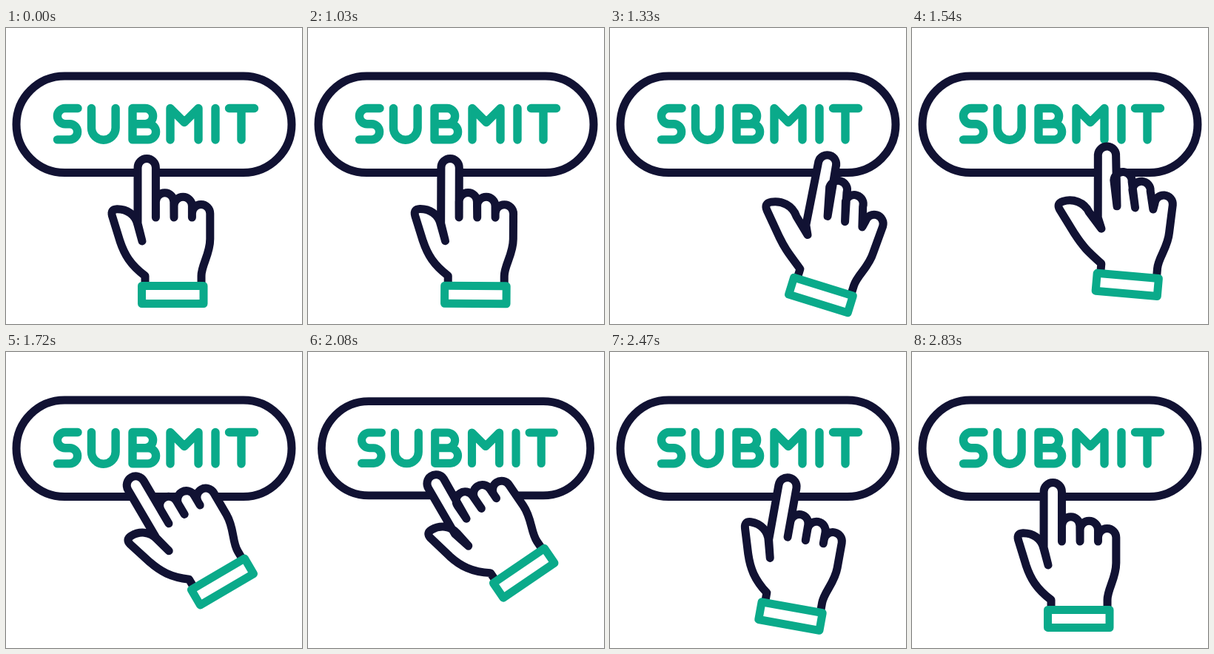
Recreate the animation shown at these times as an HTML page. Size 400 by 400 pixels, loop 2.86 s.

```html
<!DOCTYPE html>
<html lang="en">
<head>
<meta charset="utf-8">
<title>Submit</title>
<style>
html, body { margin: 0; width: 100%; height: 100%; overflow: hidden; background: #fff; }
svg { display: block; width: 100%; height: 100%; }
path, rect { fill: #fff; stroke-width: 11; stroke-linecap: round; stroke-linejoin: round; }
.navy { stroke: #111233; }
.green { stroke: #0aaa8a; }
#word { fill: none; stroke-width: 11.4; }
</style>
</head>
<body>
<svg viewBox="0 0 400 400" role="img" aria-label="Submit">
  <g id="button">
    <rect class="navy" x="14" y="65" width="372" height="130.5" rx="65.2"/>
    <path class="green" id="word" d="M97 108.5H80a10.6 10.6 0 0 0 0 21.2H86a10.6 10.6 0 0 1 0 21.2H69.5
      M115.5 108.5V135a16.3 16.3 0 0 0 32.6 0V108.5
      M171 129.7V108.5H188a10.6 10.6 0 0 1 0 21.2M171 129.7H192a10.6 10.6 0 0 1 0 21.2H171Z
      M222 151V108.5L241 127.5L260 108.5V151
      M283 108.5V151
      M301.5 108.5H335.5M318 108.5V151"/>
  </g>
  <g id="hand">
    <path class="navy" id="skin"/>
    <rect class="green" x="183.5" y="348.5" width="83.5" height="24"/>
  </g>
</svg>
<script>
const LOOP = 2860;
const [button, hand, skin] = ['button', 'hand', 'skin'].map(id => document.getElementById(id));

// x, y: wrist; spread: fingers fanned out; press: force on the button, negative on rebound
const pose = (x, y, turn, spread = 0, press = 0) => ({ x, y, turn, spread, press });
const rest = pose(225, 360, 0);
const aside = pose(290, 360.5, 18.7, 1);
const touch = pose(292, 310, -30.5);
const push = pose(292, 292.5, -36.5, 0, 1.4);
const lift = pose(289, 315, -28, 0, -.7);
const settle = pose(244, 356.5, 10.3);

const moves = [
  { to: aside, from: 1000, until: 1400 },
  { to: touch, from: 1440, until: 1730 },
  { to: push, from: 1730, until: 1840 },
  { to: lift, from: 2010, until: 2220 },
  { to: settle, from: 2220, until: 2450 },
  { to: rest, from: 2450, until: 2840 }
];

function ease(t, from, until) {
  const u = Math.min(1, Math.max(0, (t - from) / (until - from)));
  return u * u * (3 - 2 * u);
}

function poseAt(t) {
  const now = { ...rest };
  for (const { to, from, until } of moves) {
    const u = ease(t, from, until);
    for (const k in now) now[k] += (to[k] - now[k]) * u;
  }
  return now;
}

function handPath(spread, press) {
  const angle = (press * 6 - spread * 27) * Math.PI / 180;
  const size = 1 + .12 * spread;
  const cos = size * Math.cos(angle), sin = size * Math.sin(angle);
  // Thumb point, turned about the thumb joint
  const p = (x, y) => {
    const dx = x - 184, dy = y - 300;
    return `${184 + dx * cos - dy * sin} ${300 + dx * sin + dy * cos} `;
  };
  const arc = 'a12.2 12.2 0 0 1 24.4 0';
  const finger = (x, y, lean, rise) =>
    `L${x} 256L${x - lean * spread} ${y - rise * spread}${arc}`;
  const tip = `L${178 + 6 * press - 10 * spread} ${188.8 + 6 * press}${arc}`;
  return `M188 345V335C168 320 ${p(160, 306)}${p(154, 288)}L${p(143.5, 254)}`
    + `Q${p(141, 245)}${p(150, 244.7)}C${p(163, 244.5)}${p(175, 252)}${p(178, 266)}`
    + `L184 288L178 ${264 + 13 * spread}${tip}`
    + finger(202.4, 235, 10, 19) + finger(227, 240.5, 8, 12) + finger(251.4, 250.7, -2, 4)
    + 'L275.8 285C275.8 306 264 320 264 335V345';
}

function draw(t) {
  const { x, y, turn, spread, press } = poseAt(t);
  const scale = 1 - .028 * press;
  button.setAttribute('transform', `translate(200 130) scale(${scale}) translate(-200 -130)`);
  hand.setAttribute('transform', `translate(${x} ${y}) rotate(${turn}) translate(-225 -360)`);
  skin.setAttribute('d', handPath(spread, press));
}

const start = performance.now();
function tick() {
  draw((performance.now() - start) % LOOP);
  requestAnimationFrame(tick);
}
tick();
</script>
</body>
</html>
```
